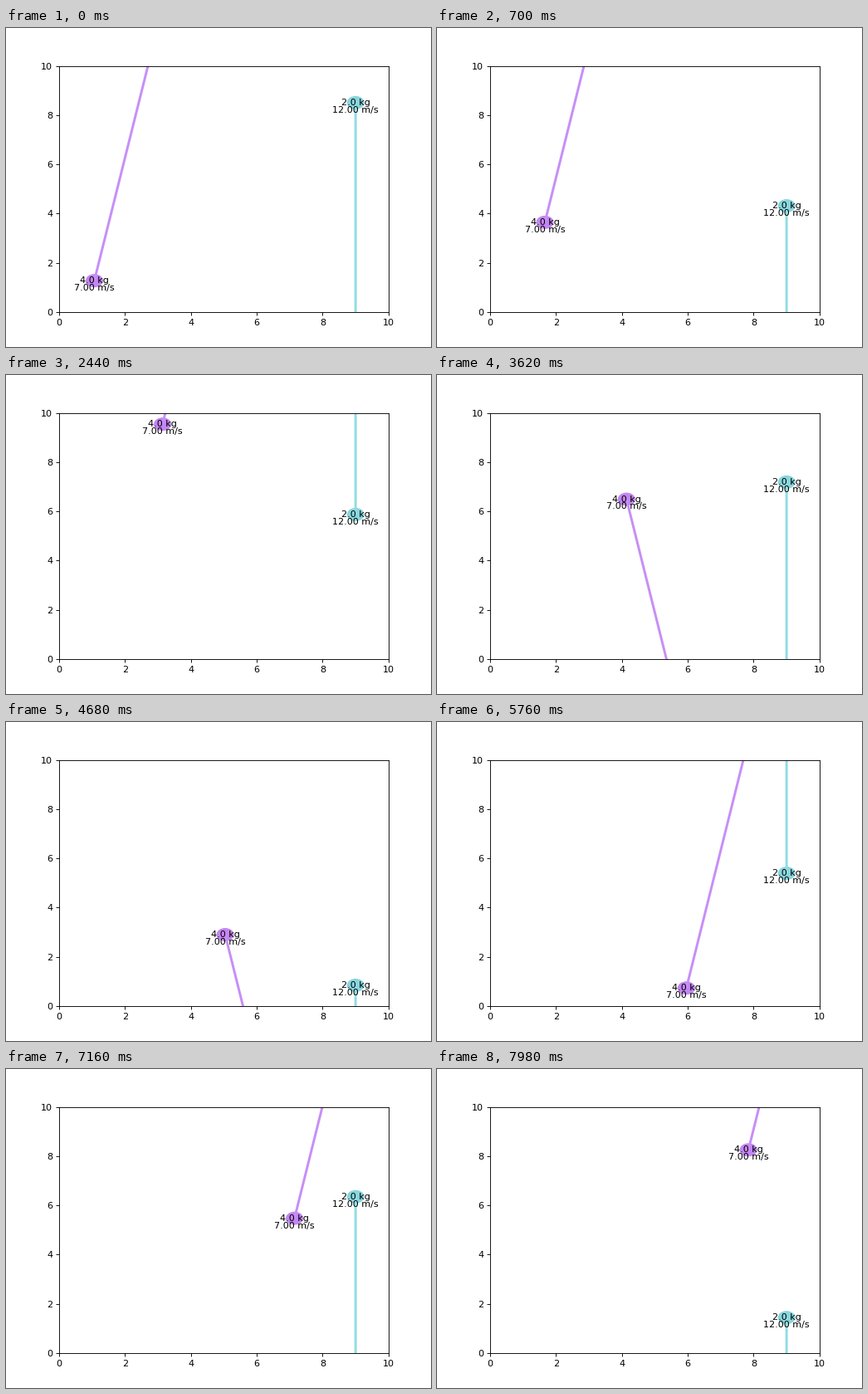
Recreate the animation shown at these times as a matplotlib script. Size 512 px wide and 384 px high, loop 8 s.

```python
import numpy as np
import matplotlib.pyplot as plt
from matplotlib.animation import FuncAnimation
from matplotlib.patches import Circle

SIZE = 10        # side of the box in metres
RADIUS = 0.25
DT = 0.01
FRAMES = 400
FIRST = 4        # simulation step shown first
INTERVAL = 20

fig, ax = plt.subplots(figsize=(6.4, 4.8), dpi=80)
ax.set_xlim(0, SIZE)
ax.set_ylim(0, SIZE)


def simulate(pos, vel, steps):
    """Positions and velocities of a ball that turns back once past a wall."""
    pos, vel = np.array(pos, float), np.array(vel, float)
    path = [(pos.copy(), vel.copy())]
    for _ in range(steps):
        pos = np.round(pos + vel * DT, 9)
        out = ((pos < 0) & (vel < 0)) | ((pos > SIZE) & (vel > 0))
        vel = np.where(out, -vel, vel)
        path.append((pos, vel))
    return path


class Ball:
    def __init__(self, mass, pos, speed, heading, color, line_color):
        heading = np.array(heading, float)
        vel = speed * heading / np.hypot(*heading)
        self.path = simulate(pos, vel, FIRST + FRAMES)
        self.disc = ax.add_patch(Circle(pos, RADIUS, color=color))
        self.arrow = ax.quiver(*pos, *vel, color=line_color, scale=1,
                               width=0.0075, zorder=2)
        style = dict(ha="center", va="center", fontsize=10)
        self.mass = ax.text(*pos, f"{mass:.1f} kg", **style)
        self.speed = ax.text(*pos, "", **style)

    def show(self, step):
        (x, y), vel = self.path[step]
        self.disc.center = x, y
        self.arrow.set_offsets([(x, y)])
        self.arrow.set_UVC(*vel)
        self.mass.set_position((x, y))
        self.speed.set_position((x, y - 0.3))
        self.speed.set_text(f"{np.hypot(*vel):.2f} m/s")
        return self.disc, self.arrow, self.mass, self.speed


balls = [
    Ball(4, (1, 1), 7, (1, 4), "#c385f3", "#c78ff6"),
    Ball(2, (9, 9), 12, (0, -1), "#88d6dd", "#92dce3"),
]


def update(frame):
    return [part for ball in balls for part in ball.show(FIRST + frame)]


anim = FuncAnimation(fig, update, frames=FRAMES, interval=INTERVAL,
                     repeat=True, repeat_delay=0, blit=False)
plt.show()
```
